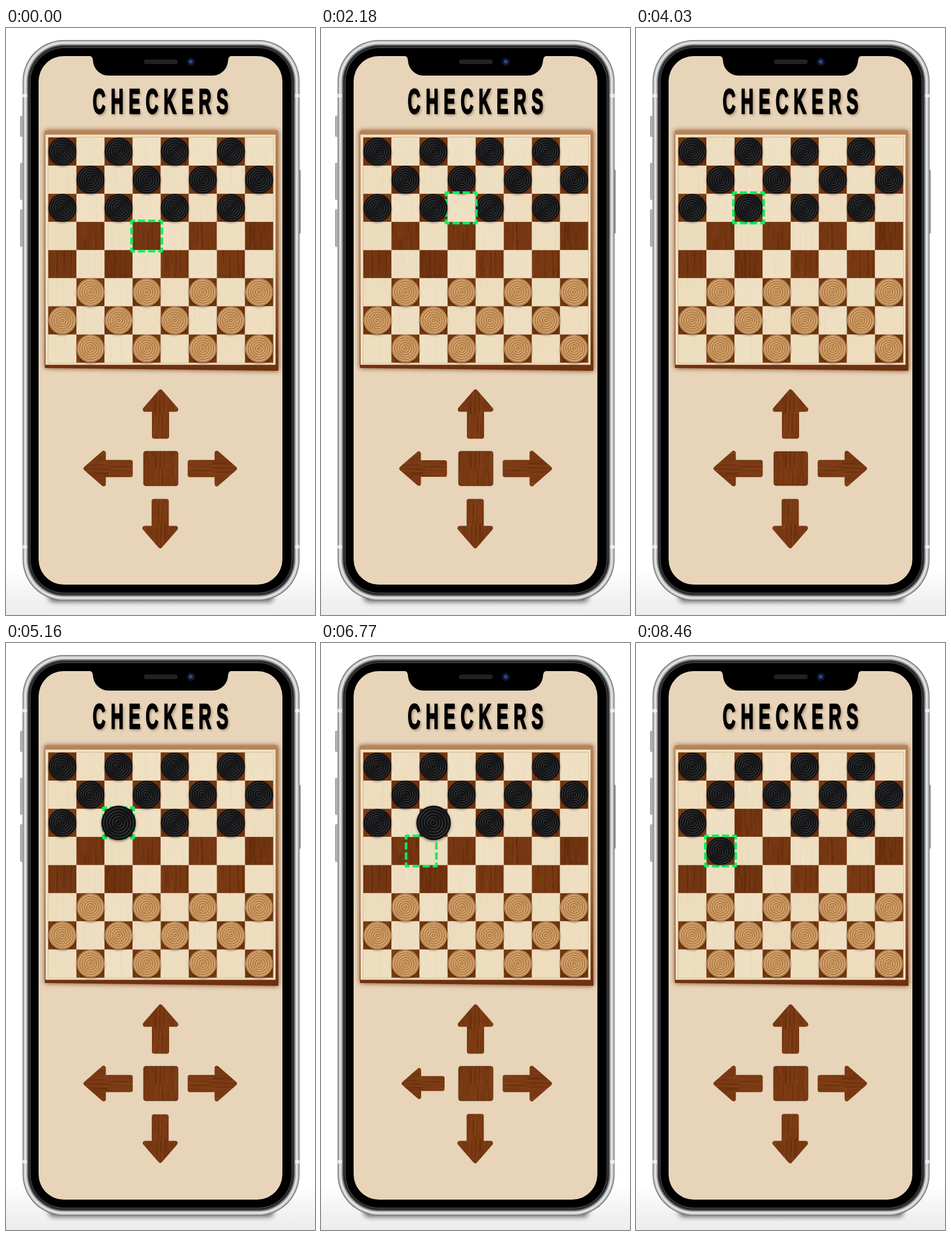
Recreate the animation shown at these times as an HTML page with a canvas. Size 540 by 1024 pixels, loop 9090 ms.

```html
<!DOCTYPE html>
<html lang="en">
<head>
<meta charset="utf-8">
<title>Checkers</title>
<style>
  html, body { margin: 0; width: 100%; height: 100%; overflow: hidden; background: #fff; }
  canvas { display: block; width: 100%; height: 100%; }
</style>
</head>
<body>
<canvas id="stage" width="540" height="1024"></canvas>
<script>
const W = 540, H = 1024, LOOP = 9090;
const CELL = 49.1, BOARD_X = 74, BOARD_Y = 191;
const stage = document.getElementById('stage').getContext('2d');

let seed = 11;
const rnd = () => (seed = (seed * 16807) % 2147483647) / 2147483647;
const clamp = v => Math.max(0, Math.min(1, v));
const mix = (a, b, k) => a + (b - a) * k;
const ease = k => k < 0.5 ? 2 * k * k : 1 - 2 * (1 - k) * (1 - k);
const part = (t, from, to) => ease(clamp((t - from) / (to - from)));
const cellX = col => BOARD_X + (col + 0.5) * CELL;
const cellY = row => BOARD_Y + (row + 0.5) * CELL;

function layer(w, h, draw) {
  const c = document.createElement('canvas');
  c.width = w;
  c.height = h;
  draw(c.getContext('2d'));
  return c;
}

function box(g, x, y, w, h, r, fill) {
  g.beginPath();
  g.roundRect(x, y, w, h, r);
  g.fillStyle = fill;
  g.fill();
}

function gradient(g, x0, y0, x1, y1, ...colors) {
  const grad = g.createLinearGradient(x0, y0, x1, y1);
  colors.forEach((c, i) => grad.addColorStop(i / (colors.length - 1), c));
  return grad;
}

// Vertical streaks over a plain base colour
function grain(base, dark, light, count) {
  return stage.createPattern(layer(192, 192, g => {
    g.fillStyle = base;
    g.fillRect(0, 0, 192, 192);
    for (let i = 0; i < count; i++) {
      g.fillStyle = i % 2 ? dark : light;
      g.globalAlpha = 0.06 + rnd() * 0.26;
      g.fillRect(rnd() * 192, rnd() * 220 - 30, 0.6 + rnd() * 1.2, 12 + rnd() * 70);
    }
  }), 'repeat');
}
const walnut = grain('#793a13', '#4d1d06', '#9c5527', 620);
const maple = grain('#efe0c4', '#dfc9a2', '#f6ead3', 90);

function disc(size, base, dark, light) {
  return layer(size, size, g => {
    const m = size / 2;
    g.translate(m, m);
    g.scale(2, 2);
    g.shadowColor = 'rgba(40,15,0,.5)';
    g.shadowBlur = 7;
    g.shadowOffsetY = 3;
    g.beginPath();
    g.arc(0, 0, 24.3, 0, 7);
    g.fillStyle = base;
    g.fill();
    g.shadowColor = 'transparent';
    for (let r = 22.8; r > 2; r -= 4.1) {
      g.lineWidth = 1.5;
      g.strokeStyle = dark;
      g.beginPath();
      g.arc(0, 0, r, 0, 7);
      g.stroke();
      g.lineWidth = 1.1;
      g.strokeStyle = gradient(g, -r, -r, r, r, light, base, light);
      g.beginPath();
      g.arc(0, 0, r - 1.6, 0, 7);
      g.stroke();
    }
  });
}
const black = disc(128, '#1d1e20', '#0b0b0c', '#4b4c4f');
const tan = disc(128, '#cd9a62', '#a97642', '#e6bd8a');

function piece(g, img, x, y, scale = 1) {
  const s = 64 * scale;
  g.drawImage(img, x - s / 2, y - s / 2, s, s);
}

function phone(g) {
  g.fillStyle = '#fff';
  g.fillRect(0, 0, W, H);
  g.fillStyle = gradient(g, 0, 945, 0, H, '#ffffff', '#f4f4f4', '#ededed');
  g.fillRect(0, 945, W, H - 945);
  g.save();
  g.filter = 'blur(5px)';
  box(g, 75, 984, 392, 17, 8, 'rgba(0,0,0,.6)');
  g.restore();

  const key = gradient(g, 25, 0, 31, 0, '#777', '#d0d0d0', '#888');
  box(g, 25, 153, 7, 37, 2, key);
  box(g, 25, 235, 7, 65, 2, key);
  box(g, 25, 316, 7, 66, 2, key);
  box(g, 509, 247, 6, 112, 2, gradient(g, 509, 0, 515, 0, '#888', '#d0d0d0', '#777'));

  const rim = [[29, 72, '#747576'], [30.5, 71, '#c9cacb'], [33, 68, '#e6e6e7'],
    [35.5, 66, '#a5a6a8'], [37.5, 64, '#4e4f51'], [39.5, 62, '#1c1c1d'],
    [41.5, 60, '#4a4a4c'], [43, 58, '#000']];
  for (const [x, r, fill] of rim) {
    box(g, x, x - 8, W + 2 - 2 * x, 1036 - 2 * x, r, fill);
  }
  for (const y of [115, 902]) {
    box(g, 29.5, y, 7, 6, 0, '#f0f0f0');
    box(g, 505.5, y, 7, 6, 0, '#f0f0f0');
  }
  box(g, 57, 49, 426, 922, 44, '#e7d4b9');

  // Notch
  g.beginPath();
  g.moveTo(144, 48);
  g.quadraticCurveTo(152, 49, 152, 57);
  g.arcTo(152, 83, 180, 83, 27);
  g.arcTo(388, 83, 388, 57, 27);
  g.lineTo(388, 57);
  g.quadraticCurveTo(388, 49, 396, 48);
  g.fillStyle = '#000';
  g.fill();
  box(g, 241, 55, 59, 8, 4, '#222224');
  box(g, 316, 52, 14, 14, 7, '#11182a');
  box(g, 319.5, 55.5, 7, 7, 3.5, '#1d3c78');
  box(g, 321, 57, 2.5, 2.5, 1.3, '#5277b8');
}

function title(g) {
  g.save();
  g.translate(270, 150);
  g.scale(0.5, 1);
  g.font = 'bold 62px "Liberation Sans", Arial, sans-serif';
  g.letterSpacing = '18px';
  g.textAlign = 'center';
  g.fillStyle = g.strokeStyle = '#000';
  g.lineWidth = 2.4;
  g.shadowColor = 'rgba(70,40,10,.45)';
  g.shadowBlur = 4;
  g.shadowOffsetX = 2;
  g.shadowOffsetY = 3;
  g.fillText('CHECKERS', 9, -1);
  g.shadowColor = 'transparent';
  g.strokeText('CHECKERS', 9, -1);
  g.restore();
}

function board(g) {
  g.save();
  g.shadowColor = '#7d3d16';
  g.shadowBlur = 9;
  g.beginPath();
  g.moveTo(68, 179);
  g.lineTo(475, 179);
  g.lineTo(476, 598);
  g.lineTo(68, 593);
  g.fillStyle = gradient(g, 0, 178, 0, 598, '#b98456', '#a76b3e', '#6d2f0e');
  g.fill();
  g.restore();
  box(g, 69, 186, 402, 401.5, 0, maple);
  g.strokeStyle = '#d5bb91';
  g.lineWidth = 1;
  g.strokeRect(73.5, 190.5, 8 * CELL + 1, 8 * CELL + 1);

  for (let row = 0; row < 8; row++) {
    for (let col = 0; col < 8; col++) {
      const dark = (row + col) % 2 === 0;
      g.save();
      g.translate(BOARD_X + col * CELL, BOARD_Y + row * CELL);
      g.beginPath();
      g.rect(0, 0, CELL, CELL);
      g.clip();
      g.translate(-rnd() * 140, -rnd() * 140);
      g.fillStyle = dark ? walnut : maple;
      g.fillRect(0, 0, 192, 192);
      g.fillStyle = `rgba(${dark ? '60,20,0' : '220,195,150'},${rnd() * 0.14})`;
      g.fillRect(0, 0, 192, 192);
      g.restore();
    }
  }
  for (let row = 0; row < 8; row++) {
    if (row === 3 || row === 4) continue;
    for (let col = row % 2; col < 8; col += 2) {
      if (row === 2 && col === 2) continue;
      piece(g, row < 3 ? black : tan, cellX(col), cellY(row));
    }
  }
}

const scene = layer(W, H, g => {
  phone(g);
  title(g);
  board(g);
});

function arrow(x, y, turn, scale) {
  const g = stage;
  g.save();
  g.translate(x, y);
  g.rotate(turn * Math.PI / 2);
  g.scale(scale, scale);
  g.beginPath();
  for (const [px, py] of [[0, -39], [27, -8], [11, -8], [11, 39], [-11, 39], [-11, -8], [-27, -8]]) {
    g.lineTo(px, py);
  }
  g.closePath();
  g.lineJoin = 'round';
  g.lineWidth = 8;
  g.fillStyle = g.strokeStyle = walnut;
  g.fill();
  g.stroke();
  g.restore();
}

function button(x, y, scale) {
  const g = stage;
  g.save();
  g.translate(x, y);
  g.scale(scale, scale);
  box(g, -30, -30, 60, 60, 4, walnut);
  g.strokeStyle = 'rgba(60,22,4,.55)';
  g.lineWidth = 1.5;
  g.stroke();
  g.restore();
}

function cursor(x, y) {
  const g = stage, side = 53;
  g.save();
  g.setLineDash([side / 3 - 5, 5]);
  g.lineDashOffset = (side / 3 - 5) / 2;
  g.lineWidth = 4.4;
  g.lineJoin = 'round';
  g.strokeStyle = '#04f25e';
  g.strokeRect(x - side / 2, y - side / 2, side, side);
  g.restore();
}

// Scale of a control tapped at each given start time
function press(t, ...starts) {
  let depth = 0;
  for (const s of starts) {
    const k = (t - s) / 630;
    if (k > 0 && k < 1) depth = 1 - Math.abs(2 * k - 1);
  }
  return 1 - 0.17 * depth;
}

function frame(now) {
  const t = now % LOOP;
  stage.drawImage(scene, 0, 0);

  arrow(270, 673.5, 0, press(t, 440));
  arrow(360.5, 768.5, 1, press(t));
  arrow(269.5, 864.5, 2, press(t, 5130));
  arrow(178.5, 768.5, 3, press(t, 1610, 6380));
  button(270.5, 768.5, press(t, 4000, 7040));

  const col = 3 - part(t, 2140, 2570) - part(t, 6560, 7010);
  const row = 3 - part(t, 1340, 1790) + part(t, 5660, 6110);
  cursor(cellX(col), cellY(row));

  const drop = part(t, 8010, 8460);
  const lift = part(t, 4315, 4630) - drop;
  piece(stage, black, cellX(2 - drop), cellY(2 + drop), mix(1, 1.24, lift));
  requestAnimationFrame(frame);
}
requestAnimationFrame(frame);
</script>
</body>
</html>
```
